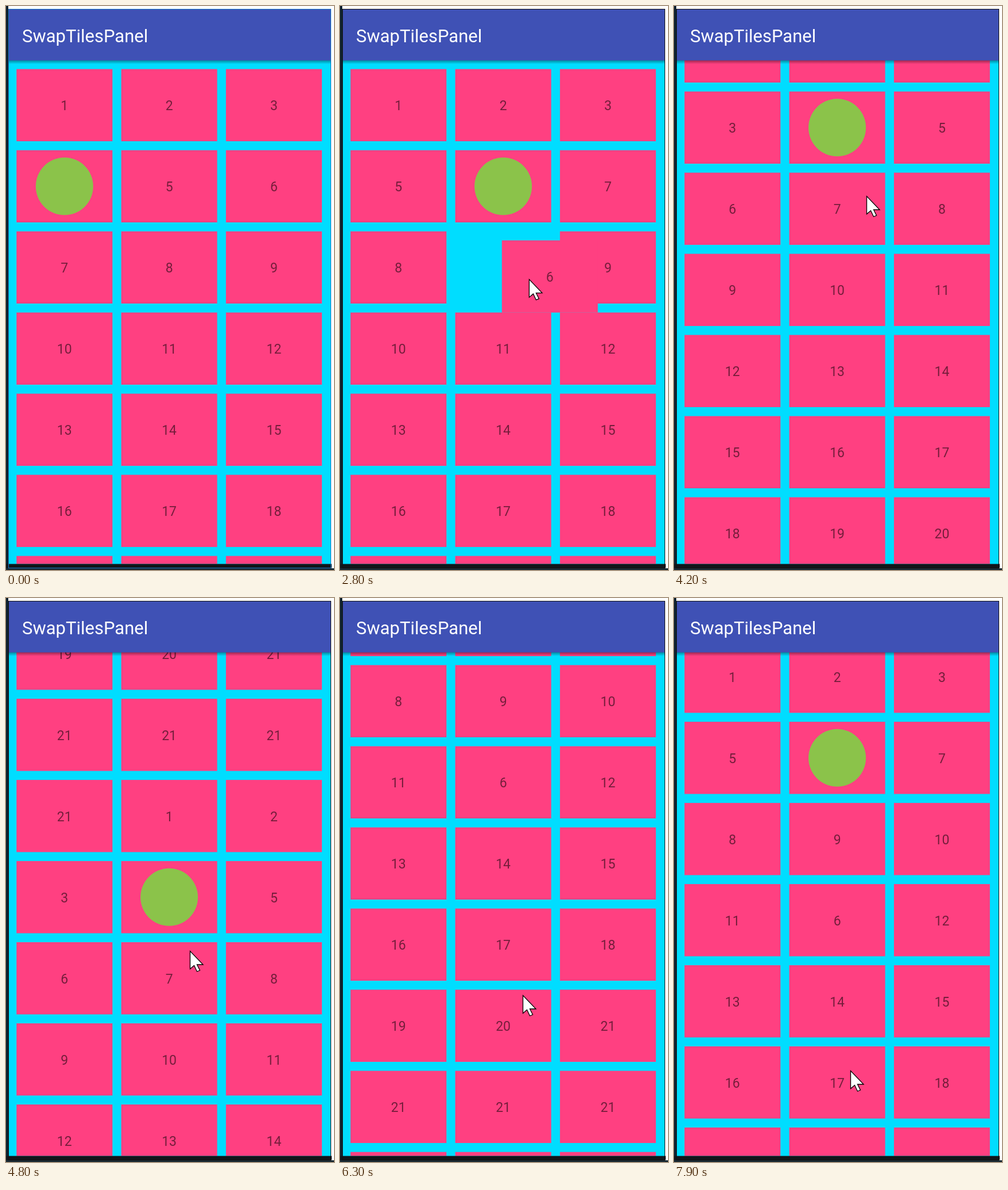
Write an HTML page with a canvas that moves like this. It is 571 px wide and 980 px high and loops after 8000 ms.

```html
<!DOCTYPE html>
<html lang="en">
<head>
<meta charset="utf-8">
<title>Tile grid</title>
<style>
  html, body { margin: 0; width: 100%; height: 100%; overflow: hidden; background: #fff; }
  canvas { display: block; }
</style>
</head>
<body>
<canvas id="stage" width="571" height="980"></canvas>
<script>
const ctx = document.getElementById('stage').getContext('2d');
const LOOP = 8000, STEP = 100, SETTLE = 200;
const COLS = 3, LEFT = 18.3, TOP = 109.6;
const TILE_W = 167, TILE_H = 125.4, PITCH_X = 182.3, PITCH_Y = 141;

// Pointer path: time, x, y, list scroll
const path = [
  [100, 470, 620, 0], [700, 107, 310, 0], [900, 107, 310, 0],
  [1300, 325, 313, 0], [1700, 331, 323, 0], [2100, 430, 318, 0],
  [2300, 430, 318, 0], [3200, 248, 600, 0], [3700, 340, 440, 827.5],
  [4200, 335, 330, 1230], [4800, 320, 613, 921.5], [6300, 318, 690, 275],
  [7400, 288, 621, 127], [7900, 307, 821, 35.5]
];
// A dragged tile follows the pointer from its first slot
const drags = [
  { from: 3, start: 900, drop: 1300 },
  { from: 5, start: 2300, drop: 3200 }
];
const arrow = new Path2D('M0 0V31L7 25L12 35.5L17 33.5L12 23.5H22.5Z');

const mix = (a, b, p) => a + (b - a) * p;
const clamp = p => Math.min(1, Math.max(0, p));

function pose(t) {
  const i = Math.max(1, path.findIndex(key => key[0] >= t));
  const [a, b] = [path[i - 1], path[i]];
  const p = clamp((t - a[0]) / (b[0] - a[0]));
  const [x, y, scroll] = [1, 2, 3].map(k => mix(a[k], b[k], p));
  return { x, y, scroll };
}

function rect(color, x, y, w, h) {
  ctx.fillStyle = color;
  ctx.fillRect(x, y, w, h);
}

function slotPos(i) {
  return { x: LEFT + i % COLS * PITCH_X, y: TOP + Math.floor(i / COLS) * PITCH_Y };
}

function nearestSlot({ x, y }) {
  return Math.round((x - LEFT) / PITCH_X) + COLS * Math.round((y - TOP) / PITCH_Y);
}

function tile(value, x, y) {
  rect('#ff4081', x, y, TILE_W, TILE_H);
  const cx = x + TILE_W / 2, cy = y + TILE_H / 2;
  if (value === 4) {
    ctx.fillStyle = '#8bc34a';
    ctx.beginPath();
    ctx.arc(cx, cy, 50, 0, 7);
    ctx.fill();
  } else {
    ctx.fillStyle = 'rgba(0,0,0,.54)';
    ctx.font = '23px Roboto, sans-serif';
    ctx.textAlign = 'center';
    ctx.fillText(value, cx, cy + 8.7);
  }
}

function grid(t) {
  const items = Array.from({ length: 75 }, (_, i) => Math.min(i % 25 + 1, 21));
  let held = null;
  for (const { from, start, drop } of drags) {
    if (t <= start) break;
    const grip = pose(start), hand = pose(Math.min(t, drop)), home = slotPos(from);
    const pos = { x: home.x + hand.x - grip.x, y: home.y + hand.y - grip.y };
    const slot = nearestSlot(pos), goal = slotPos(slot);
    const [value] = items.splice(from, 1);
    items.splice(slot, 0, value);
    if (t < drop + SETTLE) {
      const p = clamp((t - drop) / SETTLE);
      held = { slot, value, x: mix(pos.x, goal.x, p), y: mix(pos.y, goal.y, p) };
    }
  }
  const { scroll } = pose(t);
  items.forEach((value, i) => {
    const { x, y } = slotPos(i);
    if (!held || held.slot !== i) tile(value, x, y - scroll);
  });
  if (held) tile(held.value, held.x, held.y - scroll);
}

function windowFrame(focused) {
  rect('#10222e', 0, 0, 4, 980);
  rect('#10161a', 0, 969.5, 567, 7);
  rect('#1a2a33', 0, 977, 571, 3);
  ctx.lineWidth = 1;
  ctx.strokeStyle = focused ? '#1a78c2' : '#111';
  ctx.strokeRect(4.5, 5.5, 561, 971);
}

function header() {
  const shade = ctx.createLinearGradient(0, 94, 0, 101);
  shade.addColorStop(0, 'rgba(0,0,0,.4)');
  shade.addColorStop(1, 'rgba(0,0,0,0)');
  rect(shade, 5, 94, 561, 7);
  rect('#3f51b5', 5, 6, 560, 88.5);
  ctx.fillStyle = '#fff';
  ctx.font = '31px Roboto, sans-serif';
  ctx.textAlign = 'left';
  ctx.fillText('SwapTilesPanel', 28, 62.5);
}

function cursor({ x, y }) {
  ctx.save();
  ctx.translate(x + .5, y + .5);
  ctx.fillStyle = '#fff';
  ctx.strokeStyle = '#000';
  ctx.lineWidth = 1.3;
  ctx.fill(arrow);
  ctx.stroke(arrow);
  ctx.restore();
}

function draw(now) {
  const t = Math.floor(now % LOOP / STEP) * STEP;
  rect('#fff', 0, 0, 571, 980);
  rect('#00ddff', 5, 94, 561, 876);
  ctx.save();
  ctx.beginPath();
  ctx.rect(5, 94, 561, 875.5);
  ctx.clip();
  grid(t);
  ctx.restore();
  header();
  windowFrame(t < STEP);
  if (t >= STEP) cursor(pose(t));
  requestAnimationFrame(draw);
}
requestAnimationFrame(draw);
</script>
</body>
</html>
```
